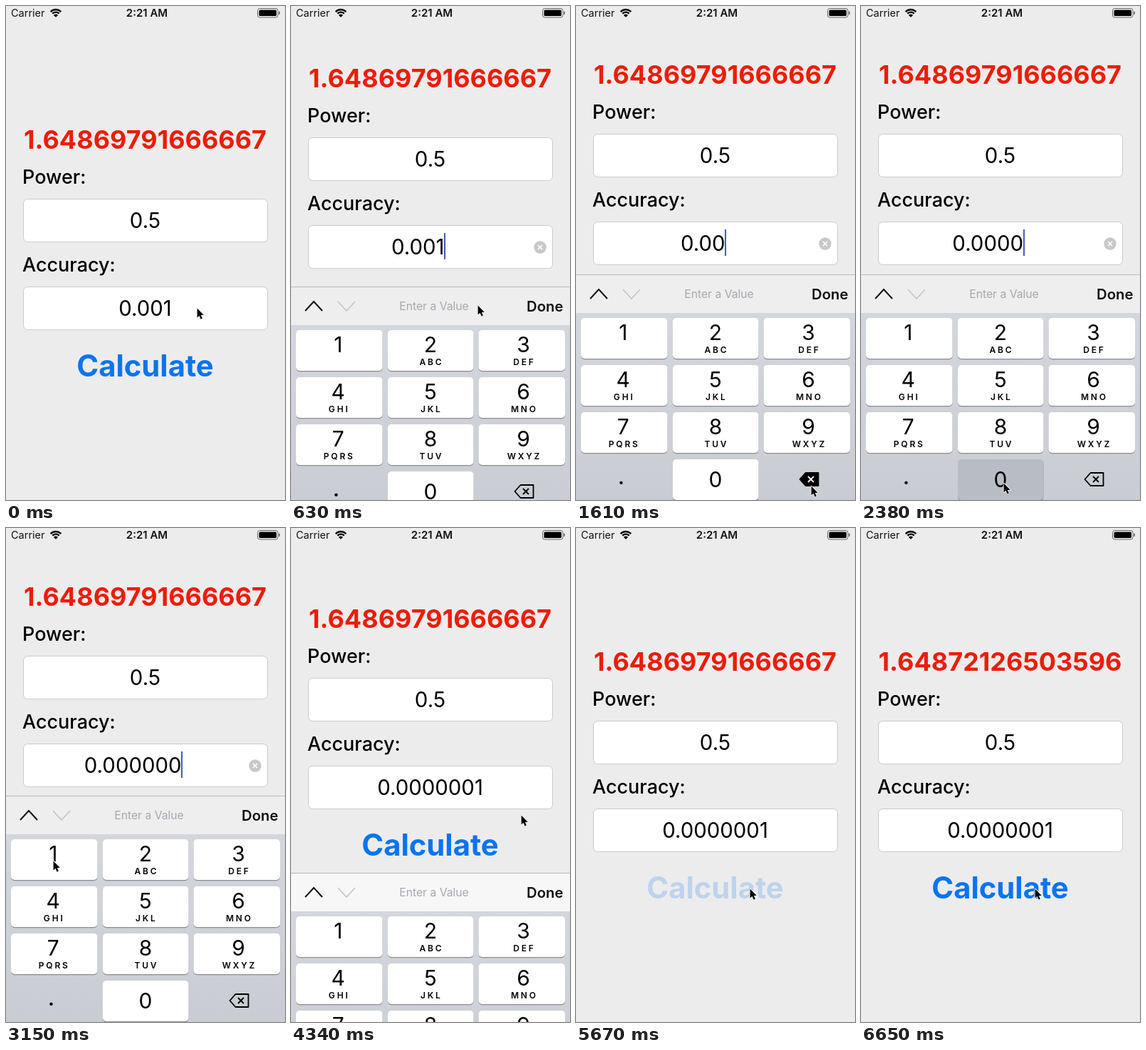
An HTML page with a canvas for the animation above (6720 ms loop, 392 by 692 pixels).

```html
<!DOCTYPE html>
<html lang="en">
<head>
<meta charset="utf-8">
<title>Exponent calculator</title>
<style>
html, body { margin: 0; width: 100%; height: 100%; overflow: hidden; background: #ececec; }
canvas { display: block; }
</style>
</head>
<body>
<canvas id="stage" width="392" height="692"></canvas>
<script>
const W = 392, H = 692, LOOP = 6720, STEP = 70;
const ctx = document.getElementById('stage').getContext('2d');

const FOCUS = 363, BLUR = 4270, RESULT = 5740;
const KEYBOARD = 317, LIFT = 91;

// Key presses: time, key, text afterwards
const presses = [
  [1540, 'del', '0.00'],
  [2170, '0', '0.000'],
  [2380, '0', '0.0000'],
  [2590, '0', '0.00000'],
  [2800, '0', '0.000000'],
  [3220, '1', '0.0000001']
];

// Pointer: time, x, y
const pointer = [
  [0, 268, 423], [350, 262, 419], [770, 262, 419], [1400, 330, 672],
  [1680, 330, 672], [2100, 200, 668], [2850, 200, 668], [3100, 66, 466],
  [3360, 66, 466], [4060, 350, 402], [4200, 350, 402], [4340, 323, 402],
  [4620, 308, 511], [4970, 302, 511], [5460, 244, 505], [LOOP, 244, 505]
];

const letters = ['', 'ABC', 'DEF', 'GHI', 'JKL', 'MNO', 'PQRS', 'TUV', 'WXYZ'];

// Critically damped spring, 0 to 1
function spring(ms) {
  if (ms <= 0) return 0;
  const s = ms * 0.0172;
  return 1 - (1 + s) * Math.exp(-s);
}

function text(str, x, y, size, weight = 400, color = '#000', align = 'center', spacing = 0) {
  ctx.font = `${weight} ${size}px Inter, "Liberation Sans", sans-serif`;
  ctx.letterSpacing = spacing + 'px';
  ctx.textAlign = align;
  ctx.fillStyle = color;
  ctx.fillText(str, x, y);
  return ctx.measureText(str).width;
}

function box(x, y, w, h, r, fill, stroke) {
  ctx.beginPath();
  ctx.roundRect(x, y, w, h, r);
  if (fill) { ctx.fillStyle = fill; ctx.fill(); }
  if (stroke) { ctx.strokeStyle = stroke; ctx.lineWidth = 1; ctx.stroke(); }
}

function line(points, color, width, close, fill) {
  ctx.beginPath();
  points.forEach(([x, y]) => ctx.lineTo(x, y));
  if (close) ctx.closePath();
  if (fill) { ctx.fillStyle = fill; ctx.fill(); }
  ctx.strokeStyle = color;
  ctx.lineWidth = width;
  ctx.stroke();
}

function cross(x, y, r, color, width) {
  line([[x - r, y - r], [x + r, y + r]], color, width);
  line([[x - r, y + r], [x + r, y - r]], color, width);
}

function statusBar() {
  text('Carrier', 7, 15, 14.5, 400, '#111', 'left');
  text('2:21 AM', 198, 15, 15, 600, '#111');
  ctx.strokeStyle = '#000';
  ctx.lineWidth = 2.3;
  for (const r of [6.4, 10]) {
    ctx.beginPath();
    ctx.arc(70, 15, r, -Math.PI * 0.76, -Math.PI * 0.24);
    ctx.stroke();
  }
  ctx.beginPath();
  ctx.moveTo(70, 15.8);
  ctx.arc(70, 15.8, 4.2, -Math.PI * 0.76, -Math.PI * 0.24);
  ctx.fillStyle = '#000';
  ctx.fill();
  box(353.5, 3.5, 28.5, 12.5, 3, null, '#666');
  box(355.5, 5.5, 24.5, 8.5, 1.5, '#000');
  box(383.2, 7.5, 1.6, 4.5, 1, '#666');
}

function field(y, str, editing, caret) {
  box(24.5, y + .5, 343, 60, 6, '#fff', '#cbcbcb');
  const mid = editing ? 178.2 : 195.5;
  const width = text(str, mid, y + 41, 29.4);
  if (!editing) return;
  if (caret) {
    ctx.fillStyle = '#4659b8';
    ctx.fillRect(Math.round(mid + width / 2 - .5), y + 11, 2, 37);
  }
  ctx.beginPath();
  ctx.arc(350, y + 31, 8.7, 0, 7);
  ctx.fillStyle = '#c8c8ca';
  ctx.fill();
  cross(350, y + 31, 3, '#fff', 1.7);
}

function form(t, dy, editing) {
  const done = presses.filter(p => t >= p[0]).pop();
  const result = t < RESULT ? '1.64869791666667' : '1.64872126503596';
  const idle = t - (done ? done[0] : FOCUS);
  text(result, 195.5, 200 + dy, 36, 700, '#ed1c06');
  text('Power:', 23, 249 + dy, 27, 500, '#000', 'left');
  field(270 + dy, '0.5');
  text('Accuracy:', 23, 372 + dy, 27, 500, '#000', 'left');
  field(393 + dy, done ? done[2] : '0.001', editing, idle % 1000 < 600);

  // The button dims while held, then fades back
  let alpha = 1;
  if (t >= 5600) alpha = Math.min(1, 0.2 + 0.8 * Math.max(0, t - RESULT) / 470);
  ctx.globalAlpha = alpha;
  text('Calculate', 195.5, 519 + dy, 41.8, 700, '#0a74f0');
  ctx.globalAlpha = 1;
}

function key(x, y, w, mid, digit, sub, down) {
  box(x, y + 1.3, w, 57, 5, '#8b8d91');
  box(x, y, w, 57, 5, down ? '#b8bcc5' : '#fff');
  text(digit, mid, y + (digit === '0' ? 38.5 : 31), 30);
  if (sub) text(sub, mid + 1.4, y + 49, 12, 600, '#000', 'center', 2.8);
}

function keyboard(t, top) {
  const active = presses.find(p => t >= p[0] && t < p[0] + 130);
  const held = active && active[1];
  const shade = ctx.createLinearGradient(0, top + 54, 0, top + KEYBOARD);
  shade.addColorStop(0, '#d3d6dc');
  shade.addColorStop(1, '#c9ccd2');
  ctx.fillStyle = shade;
  ctx.fillRect(0, top + 54, W, KEYBOARD);
  ctx.fillStyle = t < BLUR ? '#eeeeef' : '#f7f7f8';
  ctx.fillRect(0, top, W, 54);
  ctx.fillStyle = '#b9babc';
  ctx.fillRect(0, top, W, 1);

  line([[20, top + 34], [32, top + 21], [44, top + 34]], '#111', 2);
  line([[66, top + 21], [78, top + 34], [90, top + 21]], '#c2c4c7', 1.6);
  text('Enter a Value', 201, top + 33, 15.7, 400, '#a5a8ad');
  text('Done', 382.5, top + 34.5, 20.3, 600, '#111', 'right');

  const xs = [7, 136, 263.5], ws = [121.5, 120.5, 121.5], mids = [66.3, 196, 326.5];
  letters.forEach((sub, i) => {
    const digit = String(i + 1), col = i % 3;
    key(xs[col], top + 61 + Math.floor(i / 3) * 66, ws[col], mids[col], digit, sub, held === digit);
  });
  key(xs[1], top + 259, ws[1], mids[1], '0', '', held === '0');
  text('.', 63.5, top + 294, 28, 600);

  const y = top + 287, pressed = held === 'del';
  ctx.lineJoin = 'round';
  line([[314.5, y], [322.5, y - 9], [340.5, y - 9], [340.5, y + 9], [322.5, y + 9]],
    '#000', 1.8, true, pressed && '#000');
  cross(330, y, 4, pressed ? '#fff' : '#000', 1.8);
  ctx.lineJoin = 'miter';
}

function arrow(t) {
  const i = pointer.findIndex(p => p[0] > t);
  const [a, ax, ay] = pointer[i - 1], [b, bx, by] = pointer[i];
  const u = (t - a) / (b - a), e = u * u * (3 - 2 * u);
  ctx.save();
  ctx.translate(ax + (bx - ax) * e + .7, ay + (by - ay) * e + .7);
  ctx.scale(.92, .92);
  ctx.lineJoin = 'round';
  const shape = [[0, 0], [0, 13.6], [3.1, 10.8], [5.4, 16], [7.7, 15], [5.5, 10], [9.7, 9.8]];
  line(shape, '#fff', 2, true);
  line(shape, '#000', .2, true, '#000');
  ctx.restore();
}

function draw(t) {
  const shown = t < BLUR ? spring(t - FOCUS) : 1 - spring(t - BLUR);
  ctx.fillStyle = '#ececec';
  ctx.fillRect(0, 0, W, H);
  form(t, -Math.round(LIFT * shown), t >= FOCUS && t < BLUR);
  statusBar();
  if (shown > 0.001) keyboard(t, Math.ceil(H - KEYBOARD * shown));
  arrow(t);
}

const start = performance.now();
function tick() {
  const t = (performance.now() - start) % LOOP;
  draw(Math.floor(t / STEP) * STEP);
  requestAnimationFrame(tick);
}
tick();
</script>
</body>
</html>
```
